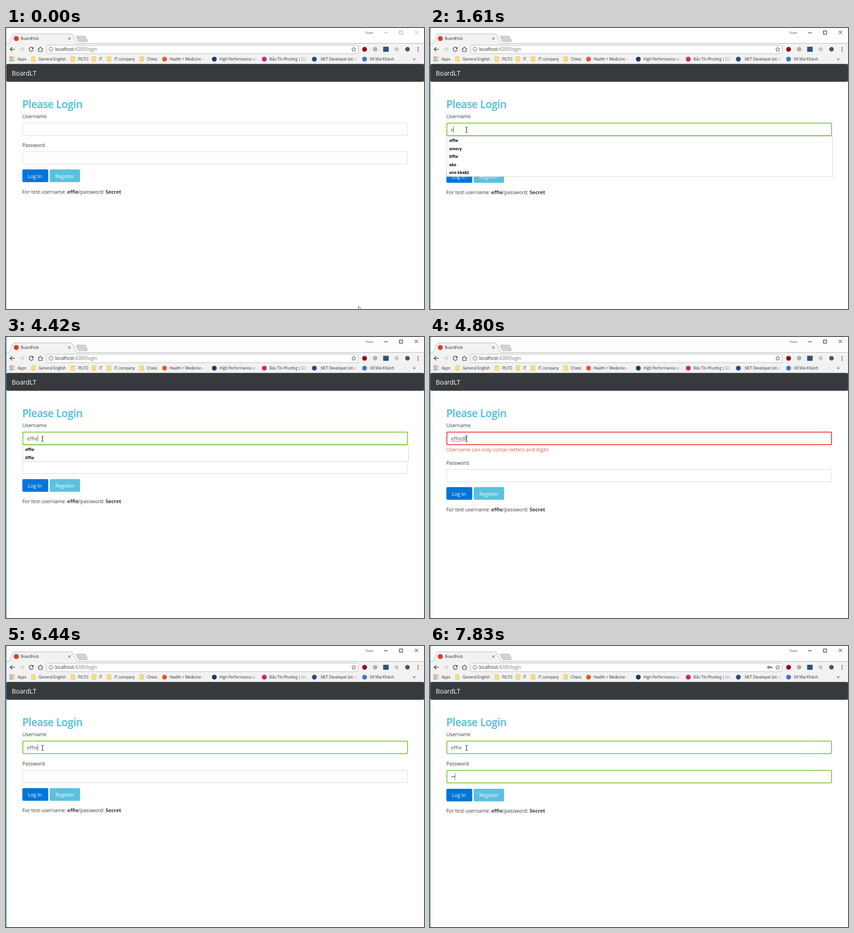
Recreate the animation shown at these times as an HTML page. Size 911 px wide and 614 px high, loop 8000 ms.

```html
<!DOCTYPE html>
<html lang="en">
<head>
<meta charset="utf-8">
<title>Login form</title>
<style>
  html, body { margin: 0; width: 100%; height: 100%; overflow: hidden; background: #fff; }
  svg { display: block; }
  text { font: 11px "Open Sans", "Noto Sans", sans-serif; letter-spacing: -.005em; fill: #373a3c; white-space: pre; }
  .ui, .ui text { font-size: 8.6px; letter-spacing: -.02em; fill: #333; }
  .bold { font-weight: 700; }
  .field { fill: #fff; }
  .input text { font-size: 11.5px; letter-spacing: 0; fill: #55595c; }
  .line { fill: none; stroke: #444; stroke-width: 1.4; }
  .title { font-size: 22.8px; font-weight: 600; letter-spacing: -.02em; fill: #5bc0de; stroke: #5bc0de; stroke-width: .3; }
  #list text { font-size: 8.5px; font-weight: 700; letter-spacing: 0; fill: #000; }
</style>
</head>
<body>
<svg width="911" height="614" viewBox="0 0 911 614">
  <defs>
    <linearGradient id="fade">
      <stop offset="0" stop-color="#f2f2f2" stop-opacity="0"/>
      <stop offset="1" stop-color="#f2f2f2"/>
    </linearGradient>
  </defs>

  <!-- browser window -->
  <rect y="33" width="911" height="45.5" fill="#f2f2f2"/>
  <path d="M0 33.5H5C8 33 8 31 9 29L14.5 15.5Q15.5 13 18 13H142Q145 13 146 15.5L151.5 29C152.5 31 152.5 33 155 33.5H911" fill="#f2f2f2" stroke="#b2b2b2"/>
  <path d="M8 34H153" stroke="#f2f2f2" stroke-width="2"/>
  <path d="M154 17.5H171Q173 17.5 174 19.5L177.5 28Q178 30 176 30H160Q158 30 157 28L153 19Q152.5 17.5 154 17.5Z" fill="#d2d2d2" stroke="#b8b8b8"/>
  <circle cx="22.5" cy="23" r="5.5" fill="#d6402b"/>
  <text class="ui" x="32" y="26">BoardHub</text>
  <path d="M135.5 20.5l5 5m0-5l-5 5" stroke="#444"/>
  <text class="ui" x="783" y="13" style="fill:#555;font-size:8px">Tuan</text>
  <path id="controls" d="M824 10.5h8M857.5 6.5h7v7h-7zM891 6l7 7m0-7l-7 7" fill="none"/>

  <g class="line">
    <path d="M19 46.5H9m4.5-4.5L9 46.5l4.5 4.5"/>
    <path d="M29 46.5h10m-4.5-4.5l4.5 4.5-4.5 4.5" stroke="#c8c8c8"/>
    <path d="M58.5 43.5a4.5 4.5 0 1 0 .8 4.5"/>
    <path d="M60 41.5v4.5h-4.5z" fill="#444" stroke="none"/>
    <path d="M69.5 47l5.5-5.5 5.5 5.5M71.5 46v5.500h7V46" stroke-width="1.2"/>
  </g>
  <rect x="88.5" y="37.5" width="679" height="18.5" rx="2" fill="#fff" stroke="#b9b9b9"/>
  <circle cx="98" cy="46.5" r="4.5" fill="none" stroke="#555"/>
  <path d="M98 46v3M98 43.5v1.2" stroke="#555"/>
  <text class="ui" x="107" y="50" style="font-size:10.2px">localhost<tspan fill="#777">:4200/login</tspan></text>
  <path d="M758 41.8l1.4 3.2 3.5.3-2.6 2.3.8 3.4-3.1-1.8-3.1 1.8.8-3.4-2.6-2.3 3.5-.3z" fill="none" stroke="#555"/>
  <path id="key" d="M740 46.5h5.5v2M743 46.5v2M740 46.5a2 2 0 1 0-4 0a2 2 0 1 0 4 0" class="line"/>
  <circle cx="781.5" cy="46.5" r="5.3" fill="#8f0f1c"/>
  <circle cx="804.5" cy="46.5" r="5" fill="#b3b3b3"/>
  <rect x="822" y="41" width="12" height="11" fill="#31537f"/>
  <circle cx="851.5" cy="46.5" r="4.5" fill="#c9c9c9"/>
  <circle cx="875" cy="46.5" r="5" fill="#4d5558"/>
  <path d="M897 42h2v2h-2zM897 45.7h2v2h-2zM897 49.4h2v2h-2z" fill="#444"/>
  <g id="bookmarks" class="ui"></g>
  <text class="ui" x="887" y="71" style="font-size:11px">»</text>
  <rect x="1" y="78.5" width="910" height="39" rx="3" fill="#373a3c"/>
  <text x="12.5" y="104" style="font-size:14px;fill:#fff">BoardLT</text>

  <!-- form -->
  <text class="title" x="35.5" y="175">Please Login</text>
  <text x="35.5" y="197">Username</text>
  <g class="input">
    <rect id="userBox" class="field"/>
    <text id="userText" x="45.5" y="226"></text>
    <path id="squiggle" fill="none" stroke="#f33" stroke-width=".9"/>
  </g>
  <text id="error" x="35.5" y="249.5" style="fill:#d9534f">Username can only contan letters and digits</text>
  <g id="passGroup">
    <text x="35.5" y="260">Password</text>
    <g class="input">
      <rect id="passBox" class="field"/>
      <text id="passText" x="46" y="289" style="font-size:12.3px"></text>
    </g>
  </g>
  <g id="rest">
    <rect x="35.7" y="309.1" width="56.5" height="27.7" rx="3" fill="#0275d8"/>
    <rect x="95.3" y="309.1" width="66.2" height="27.7" rx="3" fill="#5bc0de"/>
    <text x="47.5" y="327.5" style="fill:#fff">Log In</text>
    <text x="107.5" y="327.5" style="fill:#fff">Register</text>
    <text x="35.5" y="361.5">For test username: <tspan x="133.5" class="bold">effie</tspan><tspan x="158">/password: </tspan><tspan x="217" class="bold">Secret</tspan></text>
  </g>
  <g id="list"></g>
  <rect id="caret" width="1" height="15" fill="#777"/>
  <rect id="edge" width="1" height="614"/>
  <path id="arrow" d="M0 0V16l4-4 3 6 2-1-3-6h5z" fill="#fff" stroke="#000"/>
  <path id="beam" d="M-2.5-5.5h2m1 0h2M0-5v10M-2.5 5.5h2m1 0h2" fill="none" stroke="#000"/>
</svg>
<script>
const $ = id => document.getElementById(id);
const set = (id, attrs) => { for (const k in attrs) $(id).setAttribute(k, attrs[k]); };
const show = (id, on) => set(id, { visibility: on ? 'visible' : 'hidden' });
const write = (id, s) => { if ($(id).textContent !== s) $(id).textContent = s; };

// label, text x, icon x, icon colour (none for a folder), right end of a cut label
const bookmarks = [
  ['General English', 71, 55], ['PILTO', 157, 141], ['IT', 203, 187],
  ['IT company', 236, 220], ['Chess', 307, 291],
  ['Health + Medicine – ', 356, 345.5, '#e0592a', 438],
  ['High Performance an', 465, 454, '#1c3f66', 548],
  ['Bảo Tín Phương | Glim', 574, 563, '#d0207f', 657],
  ['.NET Developer Job in', 684, 672, '#2b4a8c', 767],
  ['Võ Mai Khánh', 793, 781.5, '#3f78c4']
];
let marks = '<text x="25" y="71">Apps</text>';
['#e04a3a', '#e04a3a', '#f0b429', '#3d9b52', '#3f78d0', '#f0b429', '#3d9b52', '#3f78d0', '#f0b429']
  .forEach((c, i) => marks += `<rect x="${8 + i % 3 * 4}" y="${62.5 + (i / 3 | 0) * 4}" width="2.5" height="2.5" fill="${c}"/>`);
for (const [label, x, icon, color, end] of bookmarks) {
  marks += `<text x="${x}" y="71">${label}</text>` + (color
    ? `<circle cx="${icon}" cy="68" r="5.3" fill="${color}"/>`
    : `<rect x="${icon + .5}" y="62.5" width="8.5" height="10.5" rx="1" fill="#fbdc83" stroke="#eec55a"/>`);
  if (end) marks += `<rect x="${end - 16}" y="60" width="16" height="16" fill="url(#fade)"/>
    <rect x="${end}" y="60" width="5" height="16" fill="#f2f2f2"/>`;
}
$('bookmarks').innerHTML = marks;

const suggestions = { 5: ['effie', 'emory', 'Effie', 'eko', 'eno kk482'], 2: ['effie', 'Effie'] };

// state changes in order of time
const script = [
  [0, { active: 0, focus: '', caret: 0, user: '', pass: 0, list: 0, squiggle: 0, key: 0 }],
  [740, { active: 1, focus: 'user', caret: 1 }],
  [1290, { caret: 0 }],
  [1610, { caret: 1, user: 'e', list: 5 }],
  [1860, { user: 'ef', list: 2 }],
  [2070, { user: 'eff' }],
  [2240, { user: 'effi' }],
  [2310, { user: 'effie' }],
  [2860, { caret: 0 }],
  [3410, { caret: 1 }],
  [3870, { caret: 0 }],
  [4420, { caret: 1 }],
  [4720, { user: 'effie@', list: 0 }],
  [4800, { squiggle: 1 }],
  [4960, { user: 'effie@@' }],
  [5110, { user: 'effie@@@' }],
  [5660, { caret: 0 }],
  [5980, { user: 'effie@@' }],
  [6210, { user: 'effie@', caret: 1 }],
  [6440, { user: 'effie', squiggle: 0 }],
  [6510, { list: 2 }],
  [6740, { caret: 0 }],
  [6970, { focus: 'pass', caret: 1, list: 0 }],
  [7520, { caret: 0 }],
  [7600, { pass: 1, caret: 1, key: 1 }],
  [7830, { pass: 2 }]
];
const stateAt = t => Object.assign({}, ...script.filter(s => s[0] <= t).map(s => s[1]));

// a filled field has a thicker border and grows by it
function drawBox(id, y, color, filled) {
  const w = filled ? 1.5 : 1, h = filled ? 29 : 28;
  set(id, { x: 36 + w / 2, y: y + w / 2, width: 840 - w, height: h - w, rx: 2.5, stroke: color, 'stroke-width': w });
}

function drawList(n) {
  if ($('list').dataset.n === String(n)) return;
  $('list').dataset.n = n;
  $('list').innerHTML = n
    ? `<rect x="36.5" y="236.5" width="841" height="${n * 17.5 + .5}" fill="#fff" stroke="#d4d4d4"/>` +
      suggestions[n].map((s, i) => `<text x="42" y="${249 + i * 17.5}">${s}</text>`).join('')
    : '';
}

function drawPointer(t) {
  const p = Math.min(9, Math.floor(t / 74)) / 9, e = p * p * (3 - 2 * p);
  const x = 768 - 688.5 * e, y = t < 740 ? 608 - 384.5 * e : 222.5;
  const beam = x > 36 && x < 876 && (y > 207 && y < 235 || y > 270 && y < 298);
  show('beam', beam);
  show('arrow', !beam);
  set('beam', { transform: `translate(${x} ${y})` });
  set('arrow', { transform: `translate(${x} ${y}) scale(.75)` });
}

function draw(t) {
  const s = stateAt(t), bad = s.user.includes('@');
  const border = (name, filled) => filled ? '#5fbf0a' : s.focus === name ? '#6bb5ea' : '#d9d9d9';
  const shift = (s.user ? 1.4 : 0) + (bad ? 17.6 : 0), passShift = Math.round(shift);

  set('controls', { stroke: s.active ? '#000' : '#999' });
  set('edge', { fill: s.active ? '#1883d7' : '#a5a5a5' });
  show('key', s.key);
  show('error', bad);
  show('squiggle', s.squiggle);
  write('userText', s.user);
  write('passText', '•'.repeat(s.pass));
  drawBox('userBox', 207, bad ? '#f00810' : border('user', s.user), s.user);
  drawBox('passBox', 270, border('pass', s.pass), s.pass);
  set('passGroup', { transform: `translate(0 ${passShift})` });
  set('rest', { transform: `translate(0 ${shift + (s.pass ? 1.4 : 0)})` });
  drawList(s.list);

  const inPass = s.focus === 'pass';
  const width = $(inPass ? 'passText' : 'userText').getComputedTextLength();
  set('caret', { x: Math.floor(45.5 + width), y: inPass ? 277 + passShift : 214 });
  show('caret', s.caret);
  drawPointer(t);
}

set('squiggle', { d: 'M46 229' + 'l2-1.5 2 1.5'.repeat(6) });
const start = performance.now();
(function loop() {
  draw((performance.now() - start) % 8000);
  requestAnimationFrame(loop);
})();
</script>
</body>
</html>
```
